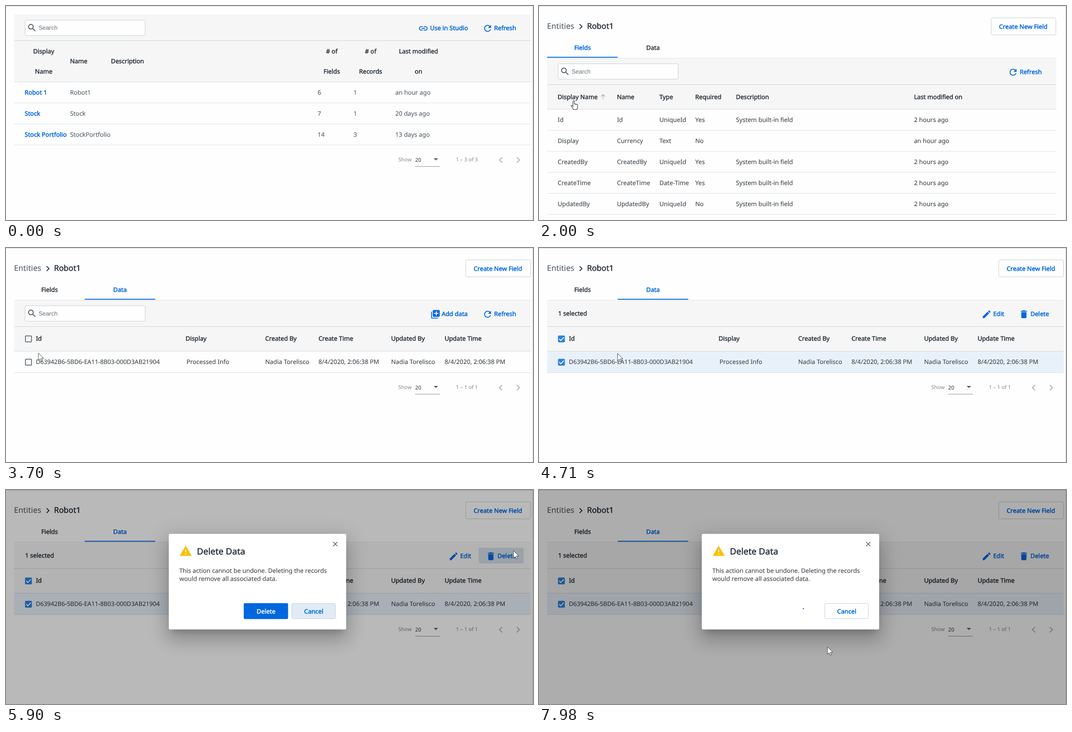
Write an HTML page that moves like this. It is 1172 by 478 pixels and loops after 8 s.

```html
<!DOCTYPE html>
<html lang="en">
<head>
<meta charset="utf-8">
<title>Entity records</title>
<style>
html, body { margin: 0; width: 100%; height: 100%; overflow: hidden; background: #fefefe; }
svg { display: block; width: 1172px; height: 478px; }
text {
  --ink: #41484e;
  font: 13.7px "Noto Sans", sans-serif;
  fill: var(--ink);
  stroke: var(--ink);
  stroke-width: .12px;
  text-rendering: geometricPrecision;
  white-space: pre;
  transform: translateX(.4px);
}
.soft { --ink: #566068; }
.head { --ink: #273139; stroke-width: .5px; }
.link { --ink: #0067df; stroke-width: .55px; }
.white { --ink: #fff; stroke-width: .5px; }
.mid { text-anchor: middle; }
.hint { --ink: #6b7278; font: 13.3px "Liberation Sans", Arial, sans-serif; stroke-width: 0; }
.crumb { font-size: 17.6px; }
.title { font-size: 19.5px; }
.id { font-size: 13.45px; }
.small { --ink: #83898e; font-size: 11.7px; stroke-width: 0; }
.dark { --ink: #273139; }
.box { fill: #fefefe; stroke: #c6ccd1; }
</style>
</head>
<body>
<svg id="stage" viewBox="0 0 1172 478"></svg>
<script>
const ICONS = {
  search: 'M15.5 14h-.79l-.28-.27A6.47 6.47 0 0 0 16 9.5 6.5 6.5 0 1 0 9.5 16c1.61 0 3.09-.59 4.23-1.57l.27.28v.79l5 4.99L20.49 19l-4.99-5zm-6 0C7.01 14 5 11.99 5 9.5S7.01 5 9.5 5 14 7.01 14 9.5 11.99 14 9.5 14z',
  link: 'M3.9 12c0-1.71 1.39-3.1 3.1-3.1h4V7H7c-2.76 0-5 2.24-5 5s2.24 5 5 5h4v-1.9H7c-1.71 0-3.1-1.39-3.1-3.1zM8 13h8v-2H8v2zm9-6h-4v1.9h4c1.71 0 3.1 1.39 3.1 3.1s-1.39 3.1-3.1 3.1h-4V17h4c2.76 0 5-2.24 5-5s-2.24-5-5-5z',
  refresh: 'M17.65 6.35A7.96 7.96 0 0 0 12 4c-4.42 0-8 3.58-8 8s3.58 8 8 8c3.73 0 6.84-2.55 7.73-6h-2.08A6 6 0 0 1 12 18c-3.31 0-6-2.69-6-6s2.69-6 6-6c1.66 0 3.14.69 4.22 1.78L13 11h7V4l-2.35 2.35z',
  add: 'M4 6H2v14c0 1.1.9 2 2 2h14v-2H4V6zm16-4H8c-1.1 0-2 .9-2 2v12c0 1.1.9 2 2 2h12c1.1 0 2-.9 2-2V4c0-1.1-.9-2-2-2zm-1 9h-4v4h-2v-4H9V9h4V5h2v4h4v2z',
  edit: 'M3 17.25V21h3.75L17.81 9.94l-3.75-3.75L3 17.25zM20.71 7.04a1 1 0 0 0 0-1.41l-2.34-2.34a1 1 0 0 0-1.41 0l-1.83 1.83 3.75 3.75 1.83-1.83z',
  bin: 'M6 19c0 1.1.9 2 2 2h8c1.1 0 2-.9 2-2V7H6v12zM19 4h-3.5l-1-1h-5l-1 1H5v2h14V4z',
  warn: 'M1 21h22L12 2 1 21zm12-3h-2v-2h2v2zm0-4h-2v-4h2v4z',
  prev: 'M15.41 7.41L14 6l-6 6 6 6 1.41-1.41L10.83 12z',
  next: 'M10 6L8.59 7.41 13.17 12l-4.58 4.59L10 18l6-6z',
  up: 'M12 5.5l-5.5 5.6 1.2 1.2 3.5-3.6V18h1.6V8.7l3.5 3.6 1.2-1.2z'
};
const ARROW = 'M0 0v16.5l3.8-3.6 2.5 5.8 2.6-1.1-2.5-5.7h5.4z';
const HAND = 'M-1.5 1.8c0-2.2 3-2.2 3 0v6c.3-1 2.4-1 2.6.3.6-.8 2.3-.5 2.4.6.8-.6 2.3-.2 2.3 1.2v4.6c0 2-1.5 3-1.5 5.5h-7.6c0-1.8-3-4.6-5-7.7-.9-1.6 1-2.4 2.2-1.2l1.6 1.7z';

// Markup helpers; icons are placed by their centre, text by its baseline.
const text = (x, y, s, c = '', id = '') => `<text x="${x}" y="${y}" class="${c}" id="${id}">${s}</text>`;
const rect = (x, y, w, h, fill, more = '') => `<rect x="${x}" y="${y}" width="${w}" height="${h}" fill="${fill}" ${more}/>`;
const path = (d, fill, more = '') => `<path d="${d}" fill="${fill}" ${more}/>`;
const line = (x1, x2, y, c = '#dcdedf') => rect(x1, y, x2 - x1, 1, c);
const icon = (name, x, y, fill = '#0067df', k = .96) =>
  path(ICONS[name], fill, `transform="translate(${x} ${y}) scale(${k}) translate(-12 -12)"`);
const group = (id, body, more = '') => `<g id="${id}" ${more}>${body}</g>`;
const frame = (x, y, w, h, id = '') => `<rect x="${x}" y="${y}" width="${w}" height="${h}" rx="3" class="box" id="${id}"/>`;
const cells = (xs, y, row, c) => row.map((s, i) => s && text(xs[i], y, s, c)).join('');
const ripple = (name, x, y, fill) =>
  `<g clip-path="url(#${name}Clip)"><circle id="${name}Ripple" cx="${x}" cy="${y}" fill="${fill}"/></g>`;
const search = y => frame(42.5, y - 17, 267, 34.5) + icon('search', 57.8, y + .2, '#4d585f') + text(72, y + 4.7, 'Search', 'hint');
const action = (name, ix, x, y, s) => icon(name, ix, y + 1) + text(x, y + 5, s, 'link');

const bar = (right, top, mid, bottom) =>
  rect(18, top, right - 18, bottom - top, '#f6f6f6') +
  line(18, right, mid, '#cdd5da') + line(18, right, bottom, '#d5d8da');

const pager = (y, range) =>
  text(872, y + 4, 'Show', 'small') + text(909.7, y + 4.5, '20', 'small dark') +
  path(`M951 ${y - 3}h10l-5 5z`, '#5b666d') + line(910, 965, y + 15, '#858b90') +
  text(1000, y + 4, range, 'small') +
  icon('prev', 1100.3, y + 1, '#b4b7b9', 1.12) + icon('next', 1139, y + 1, '#b4b7b9', 1.12);

const emptyBox = y => rect(43.3, y - 6.7, 13.4, 13.4, 'none', 'rx="1" stroke="#566069" stroke-width="1.7"');
const fullBox = y => rect(42.3, y - 7.5, 15.2, 15.2, '#2b82e0', 'rx="2"') +
  path(`M45 ${y}l3.5 3.6 6.8-7`, 'none', 'stroke="#fff" stroke-width="1.9"');

function listPage() {
  const xs = [41, 142, 692.5, 772.3, 865.3];
  const rows = [
    ['Robot 1', 'Robot1', '6', '1', 'an hour ago'],
    ['Stock', 'Stock', '7', '1', '20 days ago'],
    ['Stock Portfolio', 'StockPortfolio', '14', '3', '13 days ago']
  ];
  const heads = [[83.5, 'Display', 'Name'], [724, '# of', 'Fields'], [810.5, '# of', 'Records'], [917, 'Last modified', 'on']];
  return bar(1167, 19, 77, 169) + search(48.5) +
    action('link', 928, 942.5, 49, 'Use in Studio') + action('refresh', 1071, 1085, 49, 'Refresh') +
    heads.map(([x, a, b]) => text(x, 106, a, 'head mid') + text(x, 151, b, 'head mid')).join('') +
    text(142, 128, 'Name', 'head') + text(233, 128, 'Description', 'head') +
    rect(18, 170, 1149, 46, '#f2f4f5', 'id="rowHover"') +
    rows.map(([name, ...rest], i) => text(41, 198 + 47 * i, name, 'link') +
      cells(xs.slice(1), 198 + 47 * i, rest, 'soft') + line(18, 1167, 216 + 47 * i)).join('') +
    pager(343, '1 – 3 of 3');
}

function fieldsPanel() {
  const xs = [41.2, 173, 267.3, 347, 437.5, 833.5];
  const sys = 'System built-in field', ago = '2 hours ago';
  const rows = [
    ['Id', 'Id', 'UniqueId', 'Yes', sys, ago],
    ['Display', 'Currency', 'Text', 'No', '', 'an hour ago'],
    ['CreatedBy', 'CreatedBy', 'UniqueId', 'Yes', sys, ago],
    ['CreateTime', 'CreateTime', 'Date-Time', 'Yes', sys, ago],
    ['UpdatedBy', 'UpdatedBy', 'UniqueId', 'No', sys, ago]
  ];
  return bar(1150, 116, 175, 230) + line(18, 1150, 116, '#e3e6e8') + search(146) +
    action('refresh', 1054.3, 1068.7, 147, 'Refresh') +
    cells(xs, 208, ['Display Name', 'Name', 'Type', 'Required', 'Description', 'Last modified on'], 'head') +
    group('sort', icon('up', 142.5, 202.5, '#b3b7ba')) +
    group('rows', rows.map((r, i) => cells(xs, 259 + 47 * i, r) + line(18, 1150, 277 + 47 * i)).join('')) +
    group('scroll', rect(1150, 117, 16.5, 225, '#f1f1f1') + rect(1151.5, 133, 13.5, 109, '#c1c1c1') +
      path('M1154.5 127.5h8l-4-4z', '#a3a3a3') + path('M1154.5 331h8l-4 4z', '#505050'));
}

function dataPanel() {
  const xs = [66, 399, 576, 694.5, 856, 975];
  const who = 'Nadia Torelisco', when = '8/4/2020, 2:06:38 PM';
  return bar(1167, 116, 175, 230) + line(18, 1167, 116, '#e3e6e8') +
    rect(18, 231, 1149, 47, '#e8f1fa', 'id="picked"') + line(18, 1167, 278) +
    group('plain', search(146) + action('add', 955, 968.5, 147, 'Add data') +
      action('refresh', 1071, 1085, 147, 'Refresh') + emptyBox(203) + emptyBox(255)) +
    group('chosen', text(42, 151, '1 selected', 'head') + action('edit', 995.5, 1009.5, 147, 'Edit') +
      rect(1051, 129, 100, 35, '#ebedee', 'id="binBack" rx="3"') + ripple('bin', 1128, 137, '#d4dfea') +
      action('bin', 1078.3, 1092.5, 147, 'Delete') + fullBox(203) + fullBox(255)) +
    cells(xs, 207, ['Id', 'Display', 'Created By', 'Create Time', 'Updated By', 'Update Time'], 'head') +
    text(66, 259, 'D63942B6-5BD6-EA11-8B03-000D3AB21904', 'id') +
    cells([401, ...xs.slice(2)], 259, ['Processed Info', who, when, who, when]) +
    pager(311, '1 – 1 of 1');
}

function entityPage() {
  return text(17.3, 51, 'Entities', 'crumb soft') + icon('next', 93, 46, '#273139', 1) +
    text(106.3, 51, 'Robot1', 'crumb head') +
    group('create', frame(1005.5, 26.5, 144, 38) + text(1022.5, 50.5, 'Create New Field', 'link')) +
    rect(175, 69, 157, 47, '#e4e9ee', 'id="tabBack"') + ripple('tab', 241, 107, '#cdd7e1') +
    text(78, 97.5, 'Fields', 'head', 'tabFields') + text(238, 97.5, 'Data', 'head', 'tabData') +
    `<g clip-path="url(#panelClip)">${group('fields', fieldsPanel())}${group('data', dataPanel())}</g>` +
    rect(18, 113.5, 157, 2, '#0067df', 'id="ink"');
}

// One shadow layer of the card: drop, blur, spread and strength.
const shadow = (drop, blur, spread, alpha) =>
  rect(362 - spread, 98 + drop - spread, 394.5 + 2 * spread, 213.5 + 2 * spread, '#000',
    `opacity="${alpha}" style="filter: blur(${blur / 2}px)"`);

const dialog = () =>
  shadow(11, 15, -7, .2) + shadow(24, 38, 3, .14) + shadow(9, 46, 8, .12) +
  rect(362, 98, 394.5, 213.5, '#fff', 'rx="3"') +
  icon('warn', 399.6, 136.3, '#fdbf0b', 1.22) + text(424, 144, 'Delete Data', 'title head') +
  path('M727.5 116l9.5 9.5m0-9.5l-9.5 9.5', 'none', 'stroke="#4d585f" stroke-width="1.5"') +
  text(385, 185, 'This action cannot be undone. Deleting the records') +
  text(385, 203, 'would remove all associated data.') +
  group('confirm', rect(528.7, 252.7, 98.6, 35.6, '#0067df', 'rx="3"') + text(578, 276, 'Delete', 'white mid')) +
  frame(635.5, 253.5, 97, 34, 'cancel') + text(684, 276, 'Cancel', 'link mid') +
  '<circle id="spin" cx="578" cy="270" r="11.2" fill="none" stroke="#0067df" stroke-width="2.3" pathLength="100"/>';

document.getElementById('stage').innerHTML =
  '<defs><clipPath id="panelClip"><rect id="view" x="18" y="116" width="1149"/></clipPath>' +
  `<clipPath id="tabClip">${rect(175, 69, 157, 47, '#000')}</clipPath>` +
  `<clipPath id="binClip">${rect(1051, 129, 100, 35, '#000', 'rx="3"')}</clipPath></defs>` +
  rect(0, 0, 1172, 478, '#fefefe') + group('list', listPage()) + group('entity', entityPage()) +
  line(0, 1172, 0, '#cfcfcf') + rect(1171, 0, 1, 478, '#d4d4d4') +
  rect(0, 0, 1172, 478, '#000', 'id="shade"') + group('dialog', dialog()) +
  path(ARROW, '#fff', 'id="arrow" stroke="#3a3f45"') +
  path(HAND, '#fff', 'id="hand" stroke="#2f343a" stroke-width="1.1"');

const el = {};
document.querySelectorAll('[id]').forEach(e => el[e.id] = e);
const set = (id, attrs) => { for (const k in attrs) el[id].setAttribute(k, attrs[k]); };
const show = (id, on) => { el[id].style.display = on ? '' : 'none'; };
const clamp = v => Math.max(0, Math.min(1, v));
const part = (t, start, length) => clamp((t - start) / length);

function bezier(x1, y1, x2, y2) {
  const at = (s, a, b) => 3 * (1 - s) * (1 - s) * s * a + 3 * (1 - s) * s * s * b + s ** 3;
  return x => {
    let lo = 0, hi = 1;
    for (let i = 0; i < 20; i++) {
      const s = (lo + hi) / 2;
      if (at(s, x1, x2) < x) lo = s; else hi = s;
    }
    return at(hi, y1, y2);
  };
}
const slide = bezier(.35, 0, .25, 1), decel = bezier(0, 0, .2, 1), fade = bezier(.25, .8, .25, 1);

// The screen refreshes in bursts: first update, last update, number of updates.
const BURSTS = [[530, 920, 6], [1070, 1070, 1], [1220, 1300, 2], [1530, 1780, 4], [1920, 2000, 2], [2160, 2400, 4],
  [2710, 3470, 11], [3560, 3870, 5], [4100, 4400, 5], [4650, 5260, 9], [5580, 6350, 11], [6420, 7200, 11], [7280, 7980, 10]];
function refreshed(t) {
  const burst = BURSTS.filter(b => b[0] <= t).pop();
  if (!burst) return 0;
  const [a, b, n] = burst;
  if (n < 2) return a;
  const step = (b - a) / (n - 1);
  return Math.min(b, a + step * Math.floor((t - a) / step + .25));
}

// Pointer tip: time, x, y.
const PATH = [[530, 260, 416], [920, 55, 180], [1000, 55, 180], [1070, 51, 184], [1450, 51, 184], [1780, 57, 192],
  [1840, 57, 192], [2000, 77, 211.5], [2090, 77, 211.5], [2400, 241, 105], [3390, 241, 105], [3560, 150, 172],
  [3715, 72, 234.5], [3870, 46, 249], [4580, 46, 249], [5260, 1128.5, 135.5], [6350, 1128.5, 135.5],
  [6960, 580, 260], [7215, 580, 260], [7750, 641.5, 350.5]];
function pointer(t) {
  const i = PATH.findIndex(p => p[0] > t);
  if (i < 0) return PATH[PATH.length - 1].slice(1);
  if (!i) return PATH[0].slice(1);
  const [t0, x0, y0] = PATH[i - 1], [t1, x1, y1] = PATH[i];
  let k = (t - t0) / (t1 - t0);
  k = k * k * (3 - 2 * k);
  return [x0 + (x1 - x0) * k, y0 + (y1 - y0) * k];
}

function drawTabs(t) {
  const p = slide(part(t, 2830.7, 500)), moved = t > 2830;
  set('ink', { x: 18 + 157 * p });
  set('fields', { transform: `translate(${-1149 * p} 0)` });
  set('data', { transform: `translate(${1149 * (1 - p)} 0)` });
  set('view', { height: moved && p < 1 ? 226 : 362 });
  set('create', { transform: `translate(${moved ? 17 : 0} 0)` });
  set('tabFields', { class: moved ? 'head' : 'link' });
  set('tabData', { class: moved ? 'link' : 'head' });
  show('fields', p < 1);
  show('data', p > 0);
  show('scroll', moved);
  show('rows', t >= 1300);
  show('sort', t >= 1530 && t < 2230);
  show('tabBack', t >= 2310 && t < 3420);
  set('tabRipple', { r: 99.5 * decel(part(t, 2710, 450)), opacity: 1 - part(t, 3160, 250) });
}

function drawRecords(t) {
  const chosen = t >= 4100;
  show('plain', !chosen);
  show('chosen', chosen);
  show('picked', chosen);
  show('binBack', t >= 5580 && t < 6050);
  set('binRipple', { r: 84 * decel(part(t, 5582, 450)), opacity: 1 - part(t, 6030, 310) });
}

function drawDialog(t) {
  const open = decel(part(t, 5740, 150)), k = .7 + .3 * open, busy = t >= 7000;
  set('shade', { opacity: .32 * fade(part(t, 5740, 400)) });
  set('dialog', { opacity: open, transform: `translate(559 204.5) scale(${k}) translate(-559 -204.5)` });
  show('dialog', open > 0);
  show('confirm', !busy);
  el.cancel.style.fill = busy ? '#fff' : '#e1ebf6';
  show('spin', busy);
  // The head runs out for half a second, then the tail catches up.
  const u = 2 * part(t, 7000, 980);
  const head = 4 + 72 * slide(clamp(u)), tail = 72 * slide(clamp(u - 1));
  set('spin', {
    'stroke-dasharray': `${head - tail} ${100 - head + tail}`,
    'stroke-dashoffset': -tail,
    transform: `rotate(${(t - 7000) * .18 - 469.6} 578 270)`
  });
}

function draw(now) {
  const t = refreshed(now % 8000), [x, y] = pointer(t), hand = t >= 1070 && t < 3400;
  show('list', t < 1220);
  show('entity', t >= 1220);
  show('rowHover', t >= 530 && y >= 170 && y < 310);
  set('rowHover', { y: 170 + 47 * Math.max(0, Math.min(2, Math.floor((y - 170) / 47))) });
  drawTabs(t);
  drawRecords(t);
  drawDialog(t);
  show('arrow', t >= 530 && !hand);
  show('hand', hand);
  set(hand ? 'hand' : 'arrow', { transform: `translate(${x} ${y})` });
}

const began = performance.now();
function tick() {
  draw(performance.now() - began);
  requestAnimationFrame(tick);
}
tick();
</script>
</body>
</html>
```
